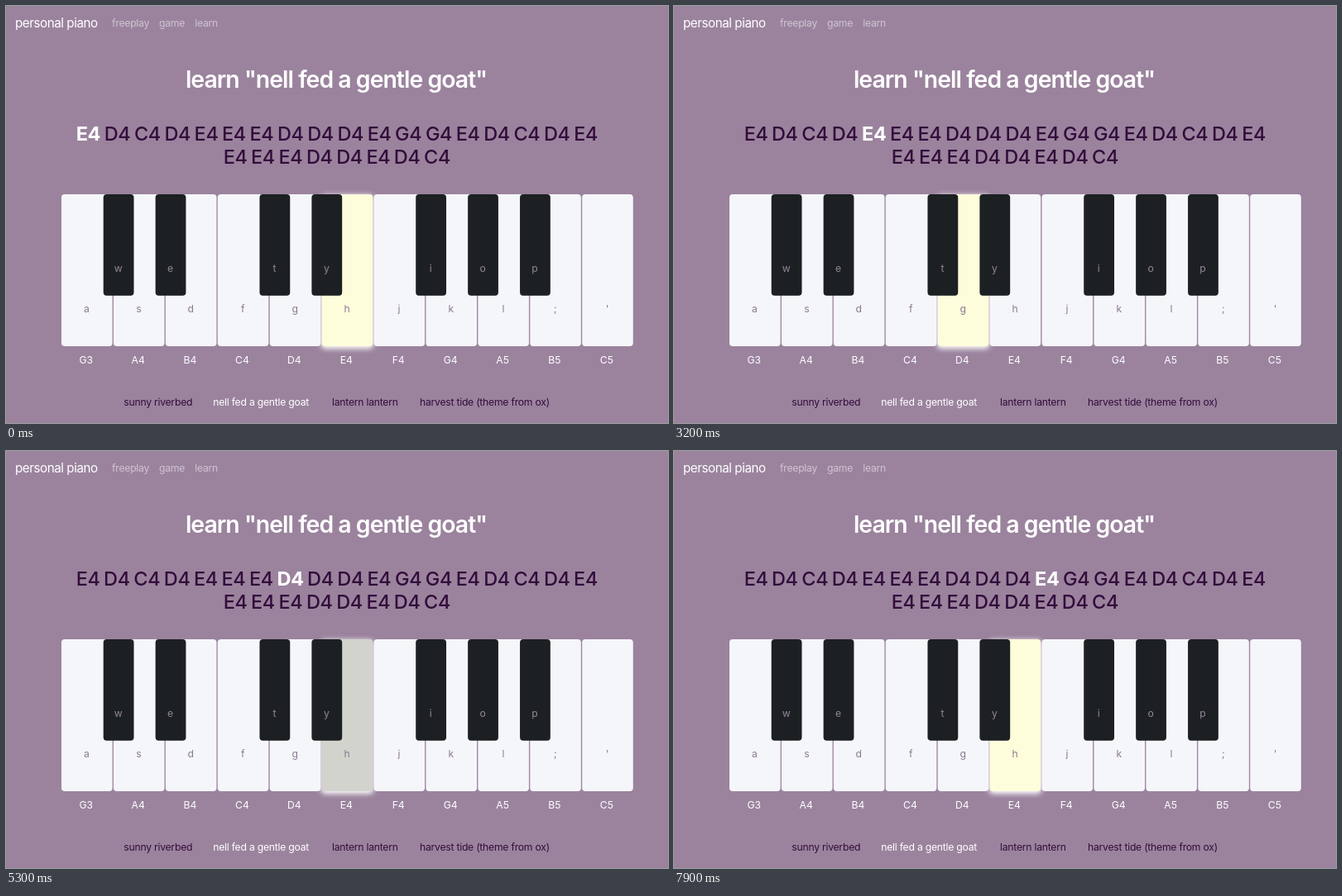
These frames come from a looping animation (800x505 px, 8 s). An HTML page:

```html
<!DOCTYPE html>
<html lang="en">
<head>
<meta charset="utf-8">
<title>personal piano</title>
<style>
  html, body { margin: 0; width: 100%; height: 100%; overflow: hidden; background: #9b839e; }
  svg { display: block; width: 800px; height: 505px; }
  text { font: 12.2px Inter, "Open Sans", sans-serif; font-optical-sizing: none; fill: #fff; }
  .brand { font-size: 15.2px; letter-spacing: -.03em; }
  .nav, .song { letter-spacing: -.02em; }
  .nav { fill: rgba(255, 255, 255, .53); }
  .song { fill: #330d3b; }
  .song.on { fill: #fff; }
  .title { font-size: 28.4px; font-weight: 560; letter-spacing: -.034em; }
  .mid { text-anchor: middle; }
  .line { word-spacing: 1.2px; }
  .note { font-size: 23.5px; font-weight: 500; letter-spacing: -.017em; fill: #330d3b; }
  .note.on { font-weight: 700; fill: #fff; }
  .cap { fill: #8a7b90; }
  .dark .cap { fill: #958599; }
  .dark rect { fill: #1c2023; }
  .glow { fill: #fff; filter: blur(3.2px); opacity: 0; }
</style>
</head>
<body>
<svg id="stage" viewBox="0 0 800 505">
  <rect width="800" height="505" fill="#9b839e"/>
  <text class="brand" x="11" y="26">personal piano</text>
  <text class="nav" x="128" y="25">freeplay</text>
  <text class="nav" x="185" y="25">game</text>
  <text class="nav" x="228.2" y="25">learn</text>
  <text class="title mid" x="399" y="98.5">learn "nell fed a gentle goat"</text>
  <text class="mid line" x="399.8" y="163"></text>
  <text class="mid line" x="399.8" y="191.4"></text>
  <g id="glows"></g>
  <g id="whites"></g>
  <g id="blacks" class="dark"></g>
  <text class="song" x="142.3" y="483.5">sunny riverbed</text>
  <text class="song on" x="250.3" y="483.5">nell fed a gentle goat</text>
  <text class="song" x="394" y="483.5">lantern lantern</text>
  <text class="song" x="500" y="483.5">harvest tide (theme from ox)</text>
</svg>
<script>
const LOOP = 8000;
const PRESSES = [800, 1700, 2450, 3200, 3750, 4400, 5100, 5850, 6500, 7200];
const LINES = ['E D C D E E E D D D E G G E D C D E', 'E E E D D E D C'];
const NAMES = 'G3 A4 B4 C4 D4 E4 F4 G4 A5 B5 C5'.split(' ');
const WHITE = [245, 246, 250], YELLOW = [253, 253, 219], GRAY = [211, 210, 205];
const PITCH = 62.92, LEFT = 67;

const $ = id => document.getElementById(id);

function add(parent, tag, attrs, content = '') {
  const el = document.createElementNS('http://www.w3.org/2000/svg', tag);
  for (const k in attrs) el.setAttribute(k, attrs[k]);
  el.textContent = content;
  parent.append(el);
  return el;
}

const melody = [], noteEls = [];
document.querySelectorAll('.line').forEach((line, row) => {
  LINES[row].split(' ').forEach((letter, i) => {
    if (i) line.append(' ');
    melody.push(letter + '4');
    noteEls.push(add(line, 'tspan', { class: 'note' }, letter + '4'));
  });
});

const keys = {};
NAMES.forEach((name, i) => {
  const x = LEFT + PITCH * i;
  keys[name] = {
    glow: add($('glows'), 'rect', { x: x - 1, y: 229, width: 63.6, height: 186, rx: 5, class: 'glow' }),
    rect: add($('whites'), 'rect', { x, y: 228, width: 61.6, height: 184, rx: 4 })
  };
  add($('whites'), 'text', { class: 'cap mid', x: x + 30.5, y: 371.2 }, "asdfghjkl;'"[i]);
  add($('whites'), 'text', { class: 'mid', x: x + 29.7, y: 433.4 }, name);
});

// Each black key sits over the right edge of a white one.
[...'we ty iop'].forEach((letter, slot) => {
  if (letter === ' ') return;
  const x = 117.7 + PITCH * slot;
  add($('blacks'), 'rect', { x, y: 228, width: 36.8, height: 122.7, rx: 4 });
  add($('blacks'), 'text', { class: 'cap mid', x: x + 18, y: 321.5 }, letter);
});

function ramp(v, from, to) {
  const p = Math.min(1, Math.max(0, (v - from) / (to - from)));
  return p * p * (3 - 2 * p);
}
const mix = (a, b, p) => a.map((v, i) => v + (b[i] - v) * p);

function paint(name, color, glow) {
  keys[name].rect.style.fill = `rgb(${color.map(Math.round)})`;
  keys[name].glow.style.opacity = glow;
}

function draw(now) {
  const t = now % LOOP;
  const step = PRESSES.filter(p => p <= t).length;
  const age = step ? t - PRESSES[step - 1] : LOOP;
  const next = melody[step], prev = step ? melody[step - 1] : next;
  const down = ramp(age, 70, 210), hand = ramp(age, 210, 330);
  const pressed = mix(YELLOW, GRAY, down);

  noteEls.forEach((el, i) => el.classList.toggle('on', i === step));
  NAMES.forEach(name => paint(name, WHITE, 0));
  if (prev === next) {
    paint(next, mix(pressed, YELLOW, hand), 1);
  } else {
    paint(prev, mix(pressed, WHITE, hand), 1 - hand);
    paint(next, mix(WHITE, YELLOW, hand), hand);
  }
}

const start = performance.now();
function tick() {
  draw(performance.now() - start);
  requestAnimationFrame(tick);
}
tick();
</script>
</body>
</html>
```
